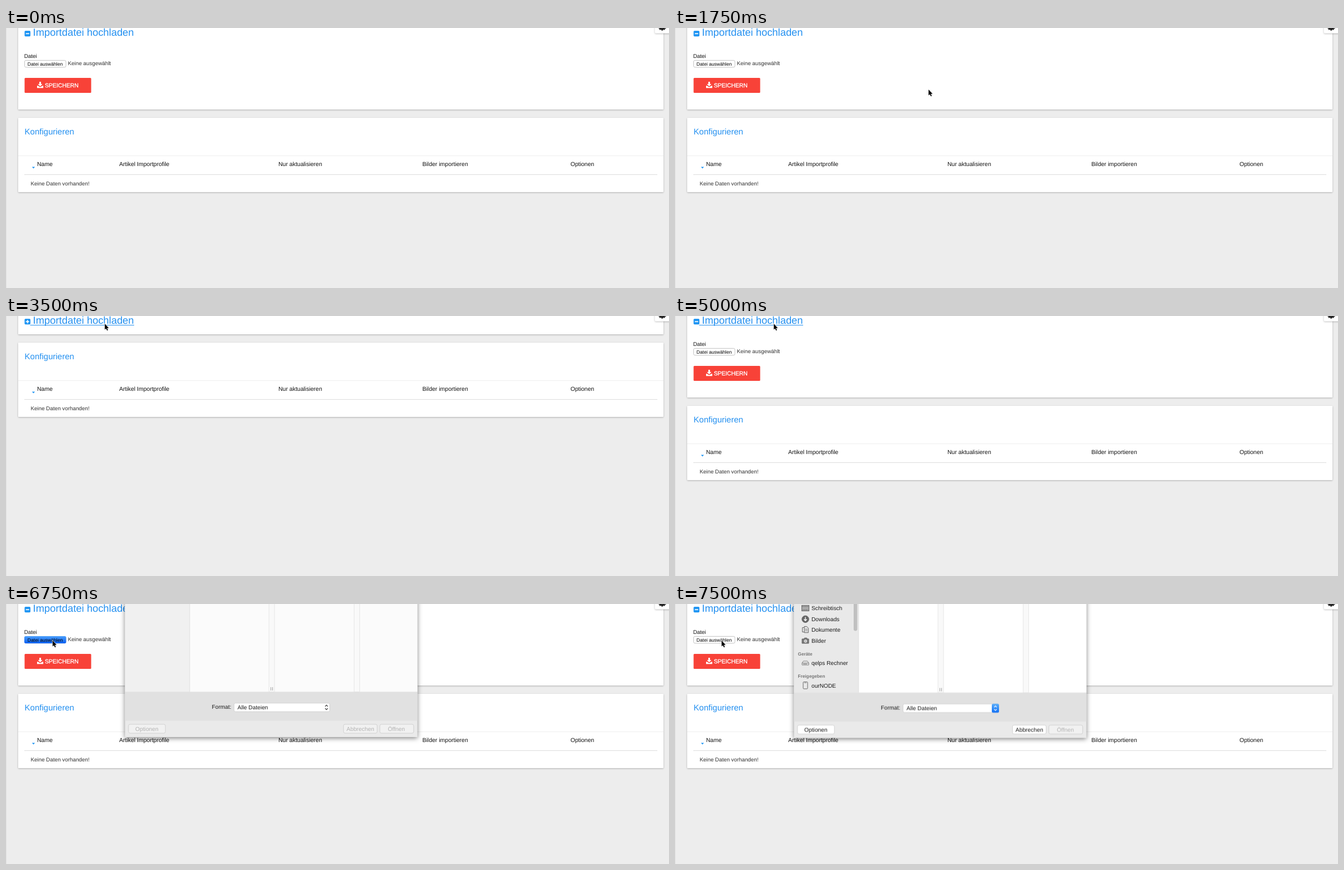
Animation, 1195 px wide and 469 px high, one loop 8000 ms. Source, as an HTML page:

```html
<!DOCTYPE html>
<html lang="de">
<head>
<meta charset="utf-8">
<title>Importdatei hochladen</title>
<style>
html, body { margin: 0; width: 100%; height: 100%; overflow: hidden; background: #ededed; }
svg { display: block; width: 100%; height: 100%; }
text { font-family: "Liberation Sans", Arial, sans-serif; text-rendering: geometricPrecision; white-space: pre; }
.th { font-size: 10.5px; fill: #111; }
.td { font-size: 9.83px; fill: #333; }
.ui { font-size: 10.2px; fill: #1c1c1c; }
.head { font-size: 8.24px; font-weight: bold; fill: #777; }
.blue { fill: #2490f0; }
.card { fill: #fff; filter: drop-shadow(0 1px 1.5px rgba(0,0,0,.26)); }
.btn { fill: #fff; stroke: #c9c9c9; stroke-width: .8; }
.rule { stroke: #dcdcdc; stroke-width: 1; }

/* every change is a hard cut */
.a { animation: 8s step-end infinite; }
#lower { animation-name: lower; }
#form { animation-name: form; }
#plus { animation-name: plus; }
#line { animation-name: line; }
#press { animation-name: press; }
#sheet { animation-name: sheet; }
#loaded { animation-name: loaded; }
#arrow { animation-name: arrow; }
#hand { animation-name: hand; }
.column { animation-name: column; }
.side { animation-name: side; }
.label { animation-name: label; }
.chev { animation-name: chev; }
.key { animation-name: key; }

@keyframes lower { 0%, 62.5%, 100% { transform: none; } 43.75% { transform: translateY(-114px); } }
@keyframes form { 0%, 62.5%, 100% { opacity: 1; } 43.75% { opacity: 0; } }
@keyframes plus { 0%, 62.5%, 100% { opacity: 0; } 43.75% { opacity: 1; } }
@keyframes line { 0%, 75%, 100% { opacity: 0; } 37.5% { opacity: 1; } }
@keyframes press { 0%, 87.5%, 100% { opacity: 0; } 75% { opacity: 1; } }
@keyframes sheet {
  0% { opacity: 0; transform: none; }
  84.375% { opacity: 1; transform: none; }
  87.5%, 100% { opacity: 1; transform: translateY(1.5px); }
}
@keyframes loaded { 0% { opacity: 0; } 87.5%, 100% { opacity: 1; } }
@keyframes column { 0% { fill: #fbfbfb; } 87.5%, 100% { fill: #fff; } }
@keyframes side { 0% { fill: #f0f0f0; } 87.5%, 100% { fill: #e9e9e9; } }
@keyframes label { 0% { fill: #b3b3b3; } 87.5%, 100% { fill: #1c1c1c; } }
@keyframes chev { 0% { stroke: #333; } 87.5%, 100% { stroke: #fff; } }
@keyframes key { 0% { fill: #f1f1f1; } 87.5%, 100% { fill: #fff; } }
@keyframes arrow {
  0% { opacity: 0; transform: translate(881px, 19px); }
  6.25% { opacity: 1; transform: translate(881px, 19px); }
  9.375% { opacity: 1; transform: translate(800px, 52px); }
  12.5% { opacity: 1; transform: translate(709px, 90px); }
  15.625% { opacity: 1; transform: translate(705px, 91px); }
  18.75% { opacity: 1; transform: translate(573px, 113px); }
  21.875% { opacity: 1; transform: translate(455px, 110px); }
  25% { opacity: 1; transform: translate(268px, 64px); }
  28.125% { opacity: 1; transform: translate(214px, 35px); }
  31.25% { opacity: 1; transform: translate(200px, 17px); }
  37.5% { opacity: 1; transform: translate(177px, 13px); }
  40.625% { opacity: 1; transform: translate(176px, 13px); }
  65.625% { opacity: 0; transform: translate(176px, 13px); }
  75%, 100% { opacity: 1; transform: translate(82px, 65px); }
}
@keyframes hand {
  0% { opacity: 0; transform: translate(172px, 14px); }
  65.625% { opacity: 1; transform: translate(172px, 14px); }
  68.75% { opacity: 1; transform: translate(82px, 75px); }
  71.875% { opacity: 1; transform: translate(81px, 65px); }
  75%, 100% { opacity: 0; transform: translate(81px, 65px); }
}
</style>
</head>
<body>
<svg viewBox="0 0 1195 469">
  <defs>
    <linearGradient id="aqua" x2="0" y2="1">
      <stop stop-color="#4b9ffb"/><stop offset="1" stop-color="#0a5ff2"/>
    </linearGradient>
    <linearGradient id="chevBox" x2="0" y2="1">
      <stop stop-color="#5aaefb"/><stop offset="1" stop-color="#1070f5"/>
    </linearGradient>
  </defs>
  <rect width="1195" height="469" fill="#ededed"/>
  <rect width="1" height="469" fill="#e2e2e2"/>

  <g id="lower" class="a">
    <rect class="card" x="22" y="-60" width="1163" height="207" rx="1"/>
    <rect class="card" x="22" y="162" width="1163" height="134" rx="1"/>
    <text class="blue" x="33.6" y="191.5" font-size="15">Konfigurieren</text>
    <path class="rule" d="M22 230.5H1185" style="stroke:#efefef"/>
    <path class="rule" d="M33 264.5H1174"/>
    <path d="M46.8 250.6h5.4l-2.7 2.8z" fill="#2196f3"/>
    <g class="th">
      <text x="56" y="249">Name</text>
      <text x="204" y="249">Artikel Importprofile</text>
      <text x="491" y="249">Nur aktualisieren</text>
      <text x="750.5" y="249">Bilder importieren</text>
      <text x="1017.5" y="249">Optionen</text>
    </g>
    <text class="td" x="44.5" y="283.5">Keine Daten vorhanden!</text>
  </g>

  <rect x="33.5" y="5" width="10.5" height="10.3" rx="1.8" fill="#2196f3"/>
  <path d="M35.8 10.2h6" stroke="#fff" stroke-width="1.7"/>
  <path id="plus" class="a" d="M38.8 7.2v6" stroke="#fff" stroke-width="1.7"/>
  <text class="blue" x="48.6" y="14" font-size="18.4">Importdatei hochladen</text>
  <path id="line" class="a" d="M43.5 16.5H231" stroke="#2490f0"/>

  <g id="form" class="a">
    <text x="32.7" y="54" font-size="9.9" fill="#111">Datei</text>
    <rect class="btn" x="33.5" y="58.4" width="74.5" height="12.4" rx="2.5" style="stroke:#b4b4b4"/>
    <rect id="press" class="a" x="33" y="58" width="75.4" height="13" rx="2.8" fill="url(#aqua)"/>
    <text x="38.8" y="67.6" font-size="8.6">Datei auswählen</text>
    <text class="td" x="111.5" y="67.4">Keine ausgewählt</text>
    <rect x="33.5" y="90" width="120" height="27" rx="1.5" fill="#f84238"/>
    <path d="M60.1 97h3v4h2.6l-4.1 4.2l-4.1-4.2h2.6z M56 104.2h2.2l2 2h2.8l2-2h2.2v4H56z" fill="#fff"/>
    <text x="70" y="107.2" font-size="10.45" fill="#fff" stroke="#fff" stroke-width=".35">SPEICHERN</text>
  </g>

  <rect class="card" x="1169.5" y="-8" width="34" height="17.5" rx="2"/>
  <path d="M1176.5 0h13v1.2h-2.4l1 1.6l-1.6 1l-1.6-1.2l-.7 2h-3l-.7-2l-1.6 1.2l-1.6-1l1-1.6h-1.8z" fill="#222"/>

  <g id="sheet" class="a">
    <rect x="214.5" y="-30" width="527" height="270" fill="#eaeaea" style="filter:drop-shadow(0 2px 4px rgba(0,0,0,.5))"/>
    <rect class="a side" x="214.5" y="-30" width="116.5" height="188.5"/>
    <rect class="a column" x="331" y="-30" width="410.5" height="188.5"/>
    <g fill="#f9f9f9" stroke="#e1e1e1" stroke-width=".8">
      <rect x="474" y="-30" width="10" height="188.5"/>
      <rect x="627.5" y="-30" width="10" height="188.5"/>
    </g>
    <path d="M331 -30V158.5" stroke="#dadada" stroke-width=".8"/>
    <path d="M477.5 150v6M480.5 150v6" stroke="#888" stroke-width=".8"/>
    <rect x="214.5" y="158.5" width="527" height="52" fill="#e1e1e1"/>
    <text class="ui" x="371" y="189.3">Format:</text>
    <rect class="btn" x="411" y="178.8" width="172.5" height="15.4" rx="2.5"/>
    <rect id="chevFill" class="a" x="571" y="178.5" width="13" height="16" rx="2.5" fill="url(#chevBox)" style="animation-name:loaded"/>
    <path class="a chev" d="M575.2 184.8l2.4-2.5l2.4 2.5M575.2 188.2l2.4 2.5l2.4-2.5" fill="none" stroke-width="1.2"/>
    <text class="ui" x="417.3" y="190" font-size="9.92">Alle Dateien</text>
    <rect class="btn a key" x="220.8" y="217" width="66.5" height="16" rx="2.8"/>
    <rect class="btn a key" x="608.3" y="217" width="60.7" height="16" rx="2.8"/>
    <rect class="btn" x="673.8" y="217" width="61" height="16" rx="2.8" style="fill:#f1f1f1"/>
    <g font-size="10.3">
      <text class="a label" x="233" y="228.8">Optionen</text>
      <text class="a label" x="613.8" y="228.8">Abbrechen</text>
      <text x="688.3" y="228.8" fill="#b3b3b3">Öffnen</text>
    </g>
  </g>

  <g id="loaded" class="a">
    <rect x="322" y="-20" width="6.5" height="68.5" rx="3.2" fill="#c0c0c0"/>
    <g fill="none" stroke="#666" stroke-width="1">
      <rect x="228.5" y="2.5" width="13" height="10" fill="#aaa"/>
      <path d="M228.5 4.5h13M230 10.5h10" stroke-dasharray="2 1"/>
      <circle cx="235" cy="27.3" r="6.2" fill="#666"/>
      <path d="M235 23.5v6M232.4 27.4l2.6 2.8l2.6-2.8" stroke="#fff" stroke-width="1.4"/>
      <path d="M229.5 42.5h5v8h-5z"/>
      <path d="M233 40.5h4.5l2.8 2.8v8.4H233z" fill="#ddd"/>
      <path d="M234.5 45.5h4M234.5 48h4" stroke-width=".7"/>
      <path d="M229 63h3.5l1-1.8h4l1 1.8h2.5v8H229z" fill="#777"/>
      <circle cx="235.3" cy="67" r="2.4" fill="#bbb" stroke="#eee"/>
      <path d="M229 106.5l2.3-3.5h7.4l2.3 3.5v3.5h-12zM229 106.5h12M231 108.3h7" stroke-width=".8"/>
      <rect x="231" y="140.5" width="8" height="12.5" rx="1.2"/>
      <path d="M233 142.2h4" stroke-width=".7"/>
    </g>
    <g class="ui">
      <text x="246" y="11.4">Schreibtisch</text>
      <text x="246" y="31">Downloads</text>
      <text x="246" y="50.3">Dokumente</text>
      <text x="246" y="69.7">Bilder</text>
      <text x="246" y="110.2">qelps Rechner</text>
      <text x="246" y="150.6">ourNODE</text>
    </g>
    <text class="head" x="221.5" y="93">Geräte</text>
    <text class="head" x="221.5" y="133.3">Freigegeben</text>
  </g>

  <path id="arrow" class="a" d="M2 1v10.6l2.4-2.2l1.7 3.8l1.7-.8l-1.7-3.6h3.2z" fill="#000" stroke="#fff" stroke-width="1.2" paint-order="stroke"/>
  <path id="hand" class="a" d="M4 8.5V2q0-1.2 1-1.2t1 1.2v3.6q1.4-.6 1.8.5q1.4-.4 1.7.6q1.5-.2 1.5 1.3v2.5q0 1.2-1 2.6v1.6H5v-1.6L1.5 9.2q-.6-1.4.6-1.5q.9 0 1.9 1.6z" fill="#fff" stroke="#000" stroke-width=".9" stroke-linejoin="round"/>
</svg>
</body>
</html>
```
